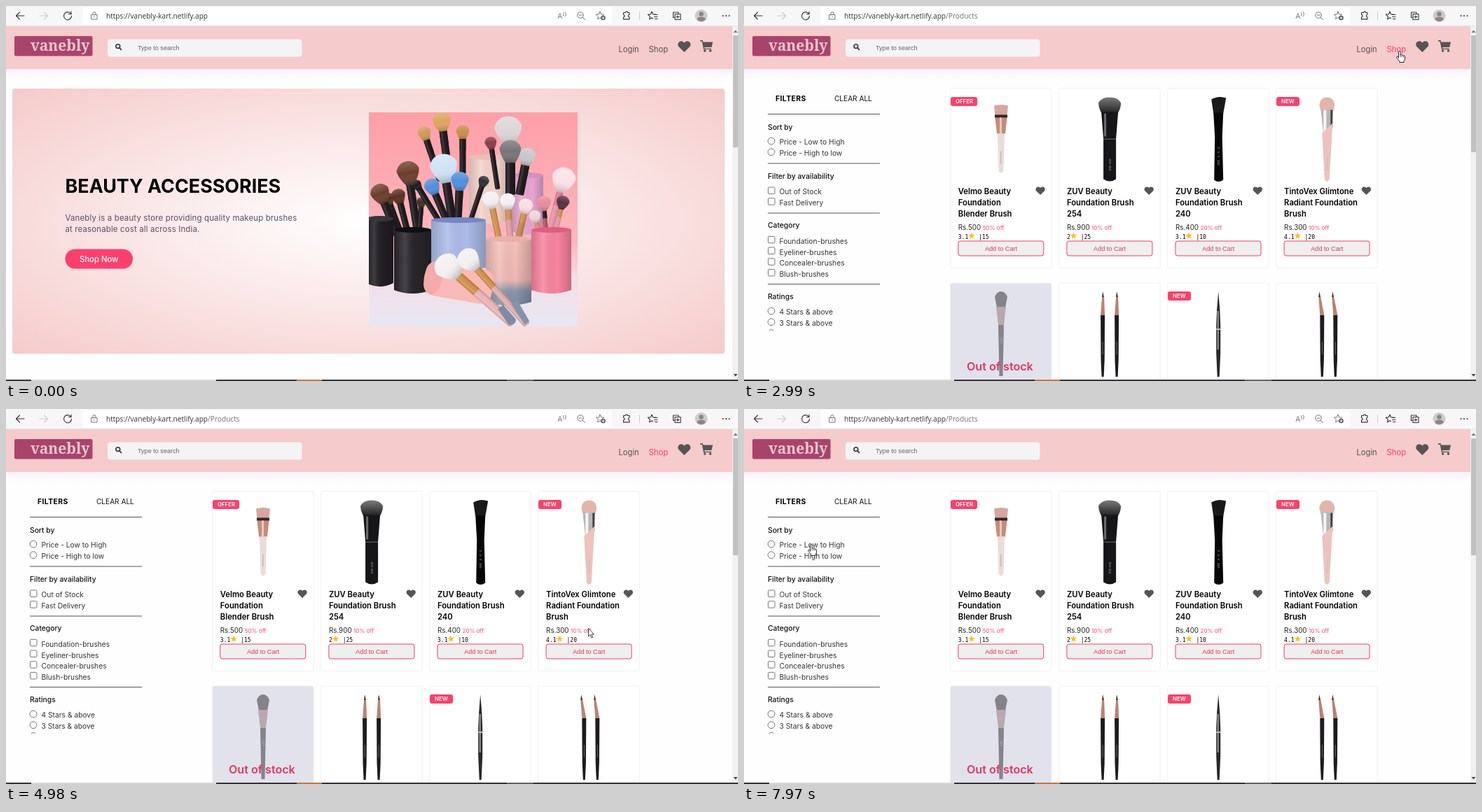
An HTML page for the animation above (8000 ms loop, 1045 by 536 pixels).

```html
<!DOCTYPE html>
<html lang="en">
<head>
<meta charset="utf-8">
<title>Vanebly store</title>
<style>
html, body { margin: 0; width: 100%; height: 100%; overflow: hidden; background: #fff; }
svg { display: block; width: 100vw; height: 100vh; }
text { font-family: Inter, sans-serif; fill: #000; white-space: pre; }
.ui { font-family: "Open Sans", "Noto Sans", sans-serif; }
.arial { font-family: "Liberation Sans", Arial, sans-serif; }
.mono { font-family: "DejaVu Sans Mono", monospace; }
.icon { fill: none; stroke: #333; stroke-width: 1.1; stroke-linecap: round; stroke-linejoin: round; }
.soft { stroke: #777; stroke-width: 1; }
.box { fill: #fff; stroke: #767676; }
.home, .shop, .toProducts, .toWishes, .hand, .arrow { animation: 8s step-end infinite; }
.home { animation-name: home; }
.shop { animation-name: shop; }
.toProducts { animation-name: toProducts; }
.toWishes { animation-name: toWishes; }
.hand { animation-name: hand; }
.arrow { animation-name: arrow; }
@keyframes home { 0% { visibility: visible } 37.375%, 100% { visibility: hidden } }
@keyframes shop { 0% { visibility: hidden } 37.375%, 100% { visibility: visible } }
@keyframes toProducts {
  0%, 37.375%, 99.625%, 100% { visibility: hidden }
  24.875%, 87.375% { visibility: visible }
}
@keyframes toWishes { 0%, 62.25%, 100% { visibility: hidden } 49.875% { visibility: visible } }
@keyframes hand {
  0%, 62.25%, 100% { transform: translate(-40px, -40px) }
  24.875% { transform: translate(930px, 64px) }
  37.375% { transform: translate(931px, 64px) }
  49.875% { transform: translate(961px, 57px) }
  87.375% { transform: translate(410px, 188px) }
  99.625% { transform: translate(91px, 193px) }
}
@keyframes arrow {
  0%, 24.875%, 87.375%, 100% { transform: translate(-40px, -40px) }
  12.5% { transform: translate(909px, 59px) }
  62.25% { transform: translate(831px, 313px) }
  74.75% { transform: translate(959px, 68px) }
}
</style>
</head>
<body>
<script>
const PINK = '#ff3f6c', GREY = '#555', SITE = 'https://vanebly-kart.netlify.app';

const rect = (x, y, w, h, fill, r = 0, more = '') =>
  `<rect x="${x}" y="${y}" width="${w}" height="${h}" rx="${r}" fill="${fill}" ${more}/>`;
const path = (d, fill, more = '') => `<path d="${d}" fill="${fill}" ${more}/>`;
const icon = (d, more = '', cls = '') => `<path class="icon ${cls}" d="${d}" ${more}/>`;
const circle = (x, y, r, fill, more = '') => `<circle cx="${x}" cy="${y}" r="${r}" fill="${fill}" ${more}/>`;
const ellipse = (x, y, rx, ry, fill) => `<ellipse cx="${x}" cy="${y}" rx="${rx}" ry="${ry}" fill="${fill}"/>`;
const text = (x, y, size, str, fill = '#000', weight = 400, cls = '', more = '') =>
  `<text x="${x}" y="${y}" class="${cls}" style="font-size:${size}px;font-weight:${weight};fill:${fill};${more}">${str}</text>`;
const group = (cls, ...parts) => `<g class="${cls}">${parts.flat().join('')}</g>`;
const at = (x, y, s, body) => `<g transform="translate(${x} ${y}) scale(${s})">${body}</g>`;
const gradient = (id, across, ...stops) => `<linearGradient id="${id}" x2="${+across}" y2="${+!across}">` +
  stops.map(([o, c, a = 1]) => `<stop offset="${o}" stop-color="${c}" stop-opacity="${a}"/>`).join('') + '</linearGradient>';

const heart = (x, y, s) => at(x, y, s,
  path('M0 8.2L-8 .2C-11.5-4-5.5-11 0-5.4C5.5-11 11.5-4 8 .2Z', GREY));
const starPoints = (x, y, r) => Array.from({ length: 10 }, (_, i) => {
  const a = i * Math.PI / 5 - Math.PI / 2, d = i % 2 ? r * .45 : r;
  return `${(x + d * Math.cos(a)).toFixed(1)},${(y + d * Math.sin(a)).toFixed(1)}`;
}).join(' ');
const star = (x, y, r) => `<polygon points="${starPoints(x, y, r)}" fill="#fcc21b"/>`;
const starLine = (x, y, r, cls = '') => `<polygon class="icon ${cls}" points="${starPoints(x, y, r)}"/>`;

const defs = `<defs>
  <radialGradient id="hero" r=".707"><stop stop-color="#fff"/><stop offset="1" stop-color="#f5cbcb"/></radialGradient>
  ${gradient('shade', false, [0, '#f3e3f5', .55], [1, '#ffffff', 0])}
  ${gradient('wall', false, [0, '#ff9fa8'], [.6, '#fbb6bd'], [.78, '#f3dfe6'], [1, '#e7e6f3'])}
  ${gradient('peach', false, [0, '#f6c1ba'], [.62, '#efb7b4'], [.78, '#8997ac'], [1, '#7b8ba4'])}
  ${gradient('tuft', false, [0, '#7b7b7b'], [1, '#222'])}
  ${gradient('round', true, [0, '#000', .14], [.3, '#fff', .14], [.65, '#000', 0], [1, '#000', .2])}
  ${gradient('bristle', false, [0, '#fff', .22], [.5, '#fff', 0], [1, '#000', .22])}
  <clipPath id="photo"><rect x="518" y="152" width="298" height="306"/></clipPath>
  <clipPath id="side"><rect x="20" y="100" width="200" height="364"/></clipPath>
  <clipPath id="page"><rect y="29" width="1037" height="505"/></clipPath>
</defs>`;

function toolbar() {
  return [
    rect(0, 0, 1045, 29, '#f7f7f7'), rect(0, 28, 1045, 1, '#e6e3e3'), rect(109, 2, 756, 24, '#fff', 4),
    icon('M26 14H14.5M19.5 9L14.5 14L19.5 19'),
    icon('M48 14H59.5M54.5 9L59.5 14L54.5 19', 'style="stroke:#ccc"'),
    icon('M92.5 11A5.5 5.5 0 1 0 93.5 14M93 8V11.5H89.5'),
    icon('M122 12.5h8v6.5h-8zM124 12V10.5a2 2 0 0 1 4 0V12M126 15v1', '', 'soft'),
    text(787.5, 18, 10.5, 'A', '#777', 400, 'ui'),
    icon('M795.5 9.5q2 2 0 4.5M798 8.5q3 3 0 6.5', '', 'soft'),
    icon('M824.3 13a4.3 4.3 0 1 0-8.6 0a4.3 4.3 0 1 0 8.6 0M823.3 16.3L826.5 19.5M818 13H822', '', 'soft'),
    starLine(848, 14, 6, 'soft'), circle(852.5, 17, 3.3, '#555'), icon('M851 17h3M852.5 15.5v3', 'style="stroke:#fff"'),
    icon('M881.5 9.5h3a1.6 1.6 0 0 1 3.2 0h2.3v3a1.6 1.6 0 0 0 0 3.4v3h-8.5v-3a1.7 1.7 0 0 0 0-3.4z'),
    rect(904, 8, 1, 12, '#ccc'),
    starLine(922, 14, 6), rect(924, 12, 8, 8, '#f7f7f7'), icon('M925 12.5H930M925.5 15.5H930M926.5 18.5H930'),
    icon('M954 16.5h-1.5v-7.5h7.5v1.5M955 11.5h8v8h-8zM959 13.5v4M957 15.5h4'),
    circle(992.5, 14, 9, '#cfcaca'), circle(992.5, 11.5, 3.2, '#8c8585'), path('M986.5 19.5q0-4 6-4t6 4q-6 5-12 0z', '#8c8585'),
    [1023.5, 1028, 1032.5].map(x => circle(x, 14, 1, '#333')),
  ].flat().join('');
}

function pageHeader() {
  return [
    rect(0, 29, 1037, 61, '#f5cbcb'), rect(0, 90, 1037, 20, 'url(#shade)'),
    rect(12, 43, 111.5, 28.5, '#a8446c', 2),
    text(35, 64, 21, 'vanebly', '#f3c6cf', 700, '', 'font-family:Noto Serif,serif'),
    rect(145, 47.5, 277.5, 25, '#f4f4f4', 4),
    circle(159.8, 57.6, 2.9, 'none', 'stroke="#333" stroke-width="1.6"'),
    path('M161.8 59.6L165 63', 'none', 'stroke="#333" stroke-width="1.8"'),
    text(188, 63, 9.1, 'Type to search', '#666', 400, 'arial'),
    text(874.5, 66, 11.2, 'Login', GREY), heart(968.3, 57.8, 1),
    path('M991 49H994.6L995.2 51.5H1009L1007.3 59H997L997.4 60.8H1006.8V62H995.9L993.6 50.8H991Z', GREY),
    circle(997.6, 64, 1.8, GREY), circle(1005.5, 64, 1.8, GREY),
  ].join('');
}

function can(x, y, w, h, fill, rim) {
  const side = `M${x} ${y}v${h}q${w / 2} 10 ${w} 0v${-h}z`;
  return path(side, fill) + path(side, 'url(#round)') + ellipse(x + w / 2, y, w / 2, 4, rim);
}

// A brush leaning from its head (x, y) down to its foot.
function brush(x, y, footX, footY, size, tip, ferrule, handle, thick = 6) {
  const length = Math.hypot(footX - x, footY - y), angle = Math.atan2(x - footX, footY - y) * 180 / Math.PI;
  const half = thick / 2, s = size, wide = s * .85;
  const head = `M${-half} ${s}Q${-wide} ${s * .3} ${-wide} ${-s * .2}Q${-wide * .7} ${-s * .8} 0 ${-s * .8}` +
    `T${wide} ${-s * .2}Q${wide} ${s * .3} ${half} ${s}Z`;
  return `<g transform="translate(${x} ${y}) rotate(${angle.toFixed(1)})">` +
    rect(-half, s * .7, thick, length - s * .7, handle, 2) +
    rect(-half, s * .7, thick, length * .32, ferrule) + rect(-half, s * .7, thick, length - s * .7, 'url(#round)', 2) +
    path(head, tip) + path(head, 'url(#bristle)') + '</g>';
}

function photo() {
  const ink = '#1f1b1f', gold = '#d6954d', brown = '#6b3e2b', snow = '#f4f0f2', blue = '#4f8fdc';
  return '<g clip-path="url(#photo)">' + [
    rect(518, 152, 298, 306, 'url(#wall)'),
    can(661, 216, 58, 90, '#f5d3ca', '#e9bfb6'), can(722, 242, 45, 80, '#e8a4d0', '#d78fbd'),
    brush(597, 181, 620, 250, 11, '#cf9a55', ink, ink, 9), brush(622, 164, 632, 240, 15, '#dda65a', ink, ink, 11),
    brush(652, 179, 652, 240, 11, '#c98e4b', ink, ink, 9),
    brush(717, 176, 722, 250, 23, '#ddd5d7', ink, ink, 10), brush(692, 195, 702, 262, 10, '#8a3d48', ink, ink, 7),
    brush(744, 214, 733, 270, 14, '#c9c6cb', ink, ink, 12), brush(720, 206, 720, 270, 18, '#77737a', ink, ink, 14),
    brush(545, 275, 566, 330, 10, '#56301f', ink, ink, 8),
    brush(574, 237, 588, 325, 19, brown, ink, ink, 11), brush(534, 267, 560, 330, 16, brown, ink, ink, 11),
    brush(560, 271, 574, 325, 12, '#56301f', ink, ink, 9), brush(593, 280, 590, 325, 8, '#442c25', ink, ink, 7),
    can(514, 304, 39, 92, '#201e22', '#38363a'), can(554, 320, 53, 86, '#272529', '#101012'),
    brush(586, 255, 618, 307, 8, ink, ink, ink, 8), brush(625, 230, 637, 305, 23, '#cfe3f7', ink, ink, 12),
    brush(608, 257, 629, 307, 13, blue, ink, ink, 10), brush(648, 249, 645, 307, 15, blue, ink, ink, 11),
    brush(682, 250, 663, 307, 9, '#302e35', ink, ink, 7),
    can(607, 306, 78, 68, '#acbbe9', '#7487c3'),
    brush(692, 276, 704, 335, 14, snow, gold, '#d8954a', 9), brush(716, 278, 720, 335, 13, snow, gold, '#e5a2a5', 9),
    brush(742, 285, 731, 335, 12, '#f9dfdf', gold, '#c98a4a', 9),
    brush(796, 247, 775, 325, 20, '#fbe2e9', '#e17e95', '#ed9aae', 9), brush(768, 281, 771, 325, 12, '#e48b9d', ink, '#b8545d'),
    brush(795, 280, 784, 325, 11, '#57323e', gold, '#ed9aae'), brush(755, 300, 762, 327, 10, '#f0d5d5', gold, '#ed9aae'),
    can(750, 320, 57, 86, '#f8839f', '#e05e82'), can(685, 333, 65, 90, 'url(#peach)', '#eab0aa'),
    '<g transform="rotate(10 645 397)">', rect(597, 370, 98, 50, '#f8bab7', 16), ellipse(609, 395, 13, 24, '#f6aaa9'), '</g>',
    brush(660, 362, 744, 456, 19, snow, gold, '#e6b1ad', 10), brush(630, 372, 724, 455, 22, snow, gold, '#efb9b6', 13),
    path('M702 433L710 427L728 448Q727 457 718 456Z', '#7d8ca6'), path('M721 426L730 421L747 450L741 456Z', '#8593aa'),
  ].join('') + '</g>';
}

function homePage() {
  return group('home',
    text(143, 18, 10.15, SITE, '#333', 400, 'ui'), text(917.5, 66, 11.4, 'Shop', GREY),
    rect(9, 118, 1017, 379, 'url(#hero)', 4), photo(),
    text(84.5, 266.5, 26.9, 'BEAUTY ACCESSORIES', '#000', 700),
    text(84.5, 307, 11.45, 'Vanebly is a beauty store providing quality makeup brushes', '#55506a', 400, '', 'letter-spacing:.15px'),
    text(84.5, 323, 11.45, 'at reasonable cost all across India.', '#55506a', 400, '', 'letter-spacing:.15px'),
    rect(84.5, 347.5, 96.5, 28, PINK, 14), text(105, 365.5, 11.3, 'Shop Now', '#fff', 500),
    rect(1038, 42, 7, 160, '#c1c1c1'));
}

const radio = y => circle(39, y, 4.9, '#fff', 'class="box"');
const check = y => `<rect class="box" x="34.5" y="${y - 5}" width="9.5" height="9.5" rx="1.5"/>`;

function filters() {
  const section = (title, y, mark, marks, labels) => text(34, y, 10.3, title, '#111', 500) +
    labels.map((label, i) => mark(marks + i * 15.7) + text(50.5, marks + 5.4 + i * 15.8, 10.25, label, '#333')).join('');
  return '<g clip-path="url(#side)">' + [
    text(45, 136, 10.4, 'FILTERS', '#000', 700, '', 'letter-spacing:.4px'), text(129, 136, 10.1, 'CLEAR ALL', '#111'),
    [154, 224.5, 295.5, 397].map(y => rect(34, y, 160, 1, GREY)).join(''),
    section('Sort by', 176.5, radio, 193, ['Price - Low to High', 'Price - High to low']),
    section('Filter by availability', 247, check, 264, ['Out of Stock', 'Fast Delivery']),
    section('Category', 317, check, 334.3, ['Foundation-brushes', 'Eyeliner-brushes', 'Concealer-brushes', 'Blush-brushes']),
    section('Ratings', 419, radio, 436, ['4 Stars &amp; above', '3 Stars &amp; above']), radio(467.5),
  ].join('') + '</g>';
}

// Product drawings are centred on x = 0 with the card top at y = 0.
const letters = (str, y) => `<g transform="translate(-1.5 ${y}) rotate(90)">${text(0, 0, 4, str, '#bbb')}</g>`;
const fineBrush = (x, bend) => at(x, 0, 1,
  path(`M${bend} 13L${bend + 2} 20L3 46H-3L${bend - 1} 20Z`, '#b98272') +
  path(`M${bend} 12L${bend + 1.5} 20H${bend - 1}Z`, '#333') +
  path('M-3 46H3L2.6 110L1.5 134H-1.5L-2.6 110Z', '#1d1b1d') + rect(-.4, 84, .8, 18, '#777'));
const drawings = [
  path('M-10 25Q1 22 10 25L8.5 39H-8.5Z', '#d5a79d') + path('M-9 38H9L6 65H-6Z', '#c58b7c') + rect(-9, 38, 18, 4, '#33282a') +
    rect(-2, 42, 3, 23, '#eccabd') + path('M-5 65H5L3.5 118Q0 124-3.5 118Z', '#e9dcda') + rect(-1, 90, 1.5, 18, '#c9b8b6'),
  path('M-16 21Q-12 13 0 13T16 21Q16 28 12 35H-12Q-16 28-16 21Z', 'url(#tuft)') +
    path('M-12 34H12L9 72V130Q0 136-9 130V72Z', '#161517') + rect(-8, 36, 3, 33, '#6c6b6e') + rect(-9, 72, 18, 1.5, '#555') + letters('ZUV 254', 101),
  path('M-10 16Q0 10 11 14L7 36H-7Z', '#1b1a1b') + path('M-7 35H7L5.5 70L7 131Q0 136-6 131L-5 70Z', '#070707') + letters('Z . U . V   240', 84),
  path('M-11 25Q-10 13 0 13T11 25L9 32H-9Z', '#e3b5aa') + path('M-9 30H9L6 62L-4 76Z', '#b9b6b8') + rect(-5, 31, 4, 35, '#f5f5f5') +
    rect(5, 31, 3, 26, '#454145') + path('M-7 64L8 50L3.5 130Q0 137-3.5 130Z', '#ecc4bb') + letters('TINTOVEX', 98),
  path('M-9 20Q-6 12 0 12T9 20L6 35H-6Z', '#858389') + path('M-7 34H7L4 60H-4Z', '#b9a9ad') +
    path('M-4 60H4L2.5 133H-2.5Z', '#85838b') + letters('ZUV', 78),
  fineBrush(-10, 0) + fineBrush(10, 0),
  path('M0 12L2 37L3 60V100L1.5 134H-1.5L-3 100V60L-2 37Z', '#29282a') + rect(-1.5, 40, 2, 55, '#999') + rect(-3, 65, 6, 2, '#bbb'),
  fineBrush(-7, -4) + fineBrush(12, -4),
];

const badge = (x, y, str) => rect(x, y, str.length > 3 ? 38 : 33, 13, PINK, 3) + text(x + 7, y + 9.2, 7.8, str, '#fff', 600);
const frame = (x, y, fill) => rect(x, y, 144.5, 257, fill, 3, 'stroke="#f1f0f2"');

function card([lines, price, off, rating, count], i) {
  const x = 294.5 + i * 155.1, left = x + 11.3;
  return [
    frame(x, 117.5, '#fff'), at(x + 72.5, 117.5, 1, drawings[i]),
    lines.map((line, n) => text(left, 268.5 + n * 16.1, 11.25, line, '#000', 600)).join(''),
    heart(x + 128.6, 264, .74),
    `<text x="${left}" y="319.5" style="font-size:9.8px;fill:#222">Rs.${price}<tspan dx="2.5" style="font-size:8.1px;fill:${PINK}">${off}% off</tspan></text>`,
    text(left, 332.5, 8, rating, '#000', 400, 'mono'), star(left + rating.length * 4.8 + 4.8, 328.6, 5),
    text(left + rating.length * 4.8 + 15, 332.5, 8, '|' + count, '#000', 400, 'mono'),
    rect(left, 336, 122, 21, '#efefef', 3, 'stroke="#ee3f64"'),
    text(left + 38.2, 350, 9.1, 'Add to Cart', '#e8335c', 400, 'arial'),
  ].join('');
}

function shopPage() {
  const products = [
    [['Velmo Beauty', 'Foundation', 'Blender Brush'], 500, 50, '3.1', 15],
    [['ZUV Beauty', 'Foundation Brush', '254'], 900, 10, '2', 25],
    [['ZUV Beauty', 'Foundation Brush', '240'], 400, 20, '3.1', 10],
    [['TintoVex Glimtone', 'Radiant Foundation', 'Brush'], 300, 10, '4.1', 20],
  ];
  const nextRow = [0, 1, 2, 3].map(i => {
    const x = 294.5 + i * 155.1;
    return frame(x, 396, i ? '#fff' : '#e2e2ec') + at(x + 72.5, 396, 1, drawings[i + 4]);
  });
  return group('shop',
    text(143, 18, 10.15, SITE + '<tspan fill-opacity=".7">/Products</tspan>', '#333', 400, 'ui'),
    text(917.5, 66, 11.4, 'Shop', PINK), filters(),
    '<g clip-path="url(#page)">', products.map(card), nextRow,
    badge(295, 130, 'OFFER'), badge(760, 130, 'NEW'), badge(605, 408, 'NEW'),
    text(318, 521, 16.1, 'Out of stock', '#e2355f', 600), '</g>',
    rect(1038, 42, 7, 167, '#c1c1c1'));
}

const scrollbar = rect(1037, 29, 8, 505, '#f1f1f1') +
  path('M1038.5 38L1041.5 34.5L1044.5 38Z', '#777') + path('M1038.5 526L1041.5 529.5L1044.5 526Z', '#444');
const taskbar = rect(0, 534, 1045, 2, '#36343a') + rect(36, 534, 264, 2, '#d9d9dc') +
  rect(415, 534, 36, 2, '#c9763f') + rect(715, 534, 38, 2, '#66646a');
const status = (cls, page, width, opacity) => group(cls, `<g opacity="${opacity}">`,
  path(`M0 517.5H${width - 4}q4 0 4 4V534H0Z`, '#f7f7f7', 'stroke="#d5d5d5"'),
  text(2, 529.5, 8.85, SITE + page, '#333', 400, 'ui'), '</g>');
const hand = group('hand', path('M3.5 10.5V1.8Q3.5.5 4.8.5T6.1 1.8V6Q7.3 5.2 8.3 6.4Q9.6 5.8 10.4 7Q12.5 6.6 12.5 8.5V11.5Q12.3 13.5 11 14.8V16.5H5V15L1 10.5Q0 9 1.2 8.3T3.5 10Z', '#fff', 'stroke="#111" stroke-width=".9"'),
  icon('M6.1 6V9M8.3 6.8V9M10.4 7.3V9.3', 'style="stroke-width:.7"'));
const arrow = group('arrow', path('M.5.5V12L3 9.6L4.9 14.2L6.8 13.4L4.9 9H8.5Z', '#fff', 'stroke="#111" stroke-width=".8"'));

document.body.innerHTML = `<svg viewBox="0 0 1045 536" preserveAspectRatio="none">${[
  defs, rect(0, 0, 1045, 536, '#fefefe'), toolbar(), pageHeader(), scrollbar,
  homePage(), shopPage(), taskbar,
  status('toProducts', '/Products', 172.5, 1), status('toWishes', '/WishList', 170, .4),
  hand, arrow].join('')}</svg>`;
</script>
</body>
</html>
```
